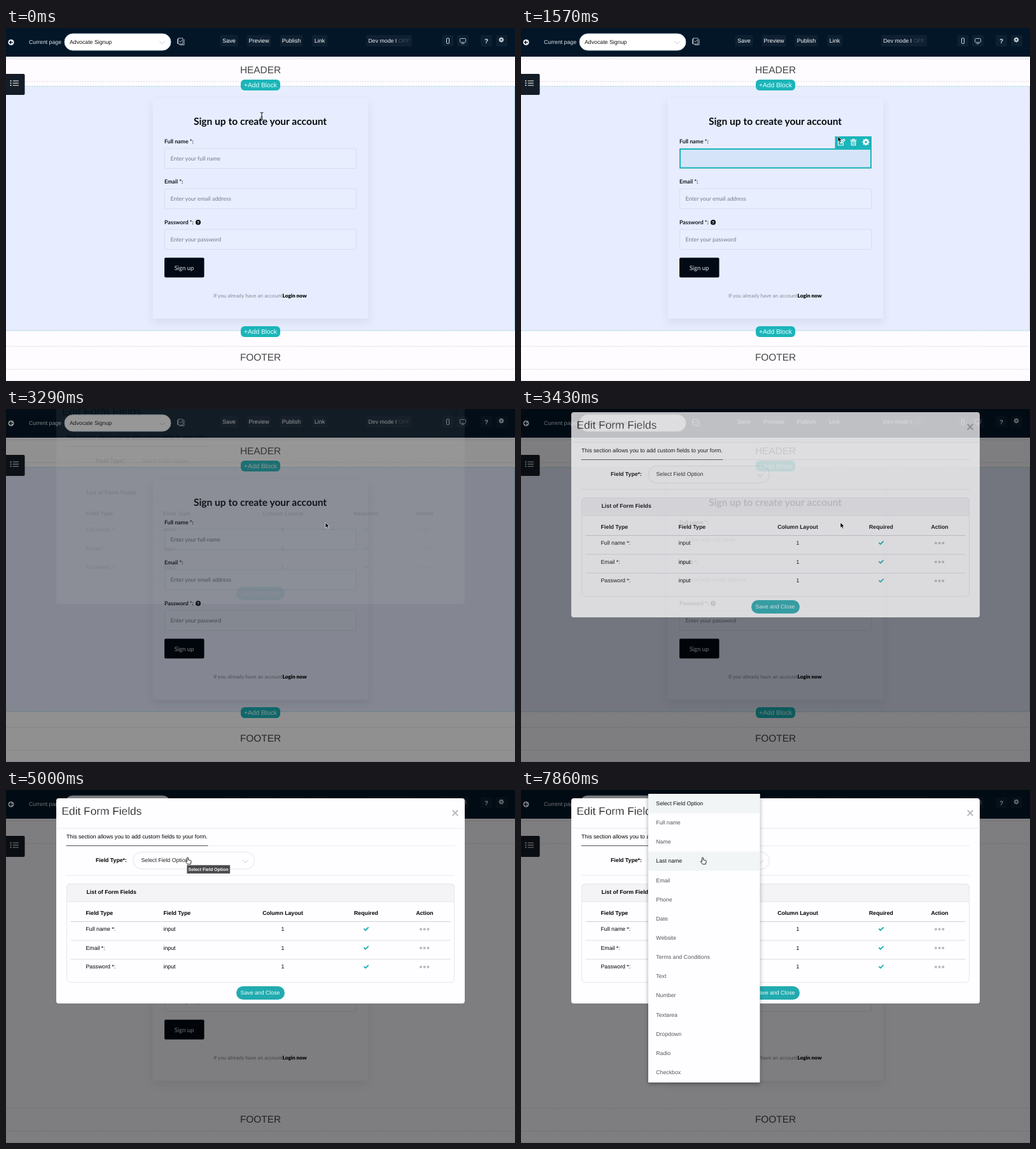
Recreate the animation shown at these times as an HTML page. Size 800 by 554 pixels, loop 8000 ms.

```html
<!DOCTYPE html>
<html lang="en">
<head>
<meta charset="utf-8">
<title>Form builder</title>
<style>
  html, body { margin: 0; width: 100%; height: 100%; overflow: hidden; background: #fefcff; }
  svg { display: block; width: 800px; height: 554px; }
  text { font: 8.76px "Liberation Sans", Arial, sans-serif; text-rendering: geometricPrecision; white-space: pre; }
  .lato { font-family: Lato, sans-serif; }
  .bold { font-weight: 700; }
  .mid { text-anchor: middle; }
  .line { fill: none; stroke-linecap: round; stroke-linejoin: round; }
  #card { filter: drop-shadow(0 6px 7px rgba(10, 20, 50, .08)); }
  #tint { mix-blend-mode: multiply; }
  #menu > rect:first-child { filter: drop-shadow(0 2px 3px rgba(0, 0, 0, .35)); }
</style>
</head>
<body>
<svg id="stage" viewBox="0 0 800 554" xmlns="http://www.w3.org/2000/svg">
  <defs>
    <path id="gear" d="M-1-5h2l.4 1.5 1.2.5 1.4-.8 1.3 1.3-.8 1.4.5 1.2 1.5.4v2l-1.5.4-.5 1.2.8 1.4-1.3 1.3-1.4-.8-1.2.5L1 8h-2l-.4-1.5-1.2-.5-1.4.8-1.3-1.3.8-1.4L-5 2.9l-1.5-.4v-2L-5 .1l.5-1.2-.8-1.4L-4-3.8l1.4.8 1.2-.5zM0-.6a2.1 2.1 0 1 0 .01 0z" fill-rule="evenodd"/>
    <path id="tick" class="line" d="M-3 .2L-.9 2.2 3.2-2" stroke="#1bb0b4" stroke-width="1.9"/>
    <g id="dots" fill="#b9b9bd"><circle cx="-5.7" r="2"/><circle r="2"/><circle cx="5.7" r="2"/></g>
  </defs>
  <g id="page"></g>
  <rect id="shade" width="800" height="554"/>
  <g id="modal"></g>
  <g id="menu"></g>
  <g id="tip"></g>
  <g id="cursor">
    <path class="line" d="M-2-5.5Q0-5.5 0-4Q0-5.5 2-5.5M0-4V4M-2 5.500Q0 5.500 0 4Q0 5.500 2 5.500M-1 1.500H1" stroke="#111" stroke-width="1"/>
    <path d="M0 0V8.600L2 6.800 3.300 9.900 4.900 9.200 3.600 6.200H6.200Z" fill="#000" stroke="#fff" stroke-width=".7"/>
    <path d="M-1 .8Q0-.4 1 .8V4.200L4.800 5Q5.800 5.400 5.600 6.600L4.800 10.800H-.2L-3.300 6.800Q-3.200 5.400-1 6.800Z" fill="#fff" stroke="#111" stroke-width=".9" stroke-linejoin="round"/>
  </g>
</svg>
<script>
const $ = id => document.getElementById(id);
const TEAL = '#1bb5b9';

const attrs = o => Object.entries(o).map(([k, v]) => ` ${k}="${v}"`).join('');
const text = (x, y, s, cls = '', o = {}) => `<text x="${x}" y="${y}" class="${cls}"${attrs(o)}>${s}</text>`;
const size = (px, more = '') => ({ style: `font-size:${px}px;${more}` });
const box = (x, y, x2, y2, fill, r = 0, o = {}) =>
  `<rect x="${x}" y="${y}" width="${x2 - x}" height="${y2 - y}" rx="${r}" fill="${fill}"${attrs(o)}/>`;
const path = (d, stroke, w = 1, o = {}) =>
  `<path class="line" d="${d}" stroke="${stroke}" stroke-width="${w}"${attrs(o)}/>`;
const rule = (y, stroke, x = 0, x2 = 800, o = {}) => path(`M${x} ${y}H${x2}`, stroke, 1, o);
const gear = (x, y, s, fill) => `<use href="#gear" fill="${fill}" transform="translate(${x} ${y}) scale(${s}) translate(0 -1.5)"/>`;
const dash = { 'stroke-dasharray': '2 2', 'stroke-linecap': 'butt' };

function topBar() {
  const buttons = [[350.5, 'Save', 14], [397.5, 'Preview', 19], [448.5, 'Publish', 18], [493, 'Link', 12]];
  const dim = 'rgba(255,255,255,.045)';
  return box(0, 0, 800, 45, '#031628') +
    '<circle cx="8" cy="22.500" r="4.600" fill="#fff"/>' +
    path('M10.500 22.500H5.800M7.800 20.300L5.600 22.500L7.800 24.700', '#031628', 1.3) +
    text(36, 25, 'Current page', '', { fill: '#e3e7ea' }) +
    box(92, 9, 259, 35, '#fff', 13, { stroke: '#cddcf0' }) +
    text(100, 25, 'Advocate Signup', '', { fill: '#111' }) +
    path('M241.500 21L245.500 25L249.500 21', '#c3c7cc') +
    path('M271 17.500H269.500V24.500M271 16H278V25H271ZM280 18V26.500H273M272.700 20.500L274.200 22L276.700 18.800', '#aeb7bf') +
    buttons.map(([x, s, w]) => box(x - w, 11, x + w, 29, dim, 2) +
      text(x, 23, s, 'mid', { fill: '#fff', ...size(9) })).join('') +
    box(566, 11, 638, 29, dim, 2) +
    text(569.5, 23, 'Dev mode I <tspan fill="#414d59">OFF</tspan>', '', { fill: '#f0f2f4' }) +
    [694.5, 718, 755, 779].map(x => box(x - 9, 11, x + 9, 29, dim, 2)).join('') +
    box(692.5, 16, 696.5, 24.5, 'none', 1, { stroke: '#dde2e6' }) +
    box(713.5, 16.5, 722.5, 22.5, 'none', 1, { stroke: '#b9c1c8' }) +
    path('M716 24.500H720', '#b9c1c8') +
    text(755, 23.5, '?', 'mid bold', { fill: '#e8ebee', ...size(10) }) +
    gear(778.5, 18.5, .62, '#d5dade');
}

const addBlock = y => box(369, y, 431, y + 17, TEAL, 6) +
  text(400, y + 11.5, '+Add Block', 'mid', { fill: '#e9ffff', ...size(10.2) });

const input = (y, label, hint) =>
  text(249, y - 8.5, label, 'lato bold', { fill: '#15181f', ...size(8.8) }) +
  box(249.5, y, 550.5, y + 31.5, 'rgba(255,255,255,.06)', 2, { stroke: 'rgba(70,90,130,.11)' }) +
  text(258.5, y + 19, hint, 'lato', { fill: '#737a86', ...size(8.88) });

function hoverTools() {
  return box(250, 190, 550, 219.5, '#d6e4fa', 0, { stroke: TEAL, 'stroke-width': 2 }) +
    box(493.5, 170, 551, 190, TEAL) +
    path('M505 175.500H498.500V184H506.500V180.500M502.500 181L503 179L507.500 174.500L509 176L504.500 180.500Z', '#fff', 1.2) +
    path('M518 176H527M521 175.500V174.500H524V175.500M519 177.500L519.500 184H525.500L526 177.500Z', '#fff', 1.2) +
    path('M521.300 178.500V182.500M523.700 178.500V182.500', '#fff', .9) +
    gear(542, 179, .84, '#fff');
}

$('page').innerHTML =
  box(0, 0, 800, 554, '#fefcff') +
  [48.5, 84, 499.5, 535.5].map(y => rule(y, '#dfdde3', 0, 800, dash)).join('') +
  rule(553.5, '#eceaee') +
  text(400, 70.5, 'HEADER', 'mid', { fill: '#444', ...size(15.4) }) +
  text(400, 521.5, 'FOOTER', 'mid', { fill: '#444', ...size(15.4) }) +
  `<g id="card">${box(230.5, 110, 569.5, 456, '#fefcff', 2)}</g>` +
  box(0, 92, 800, 475, '#e8f0fe', 0, { id: 'tint' }) +
  `<g id="block">${rule(91.5, '#a6d3de', 0, 800, dash)}${rule(475, '#a6d3de', 0, 800, dash)}` +
  path('M799.500 92V475', '#8fc6dc', 1, dash) + addBlock(81) + addBlock(468) + '</g>' +
  topBar() +
  box(-3, 72, 29.5, 105, '#141d27', 2) +
  [83, 86.5, 90].map(y => `<circle cx="7.500" cy="${y}" r="1" fill="#fff"/>` + rule(y, '#fff', 11, 19.5)).join('') +
  text(399.5, 152, 'Sign up to create your account', 'lato bold mid', { fill: '#05090f', ...size(15.55) }) +
  input(189, 'Full name *:', 'Enter your full name') +
  input(252.3, 'Email *:', 'Enter your email address') +
  input(316, 'Password *:', 'Enter your password') +
  '<circle cx="302" cy="305" r="4" fill="#05090f"/>' +
  text(302, 307.6, '?', 'mid bold', { fill: '#fff', ...size(7) }) +
  box(249, 360.5, 311.5, 391.5, '#020a15', 2) +
  text(280, 379.5, 'Sign up', 'lato mid', { fill: '#e4e8ec', ...size(9.5) }) +
  text(326, 423, 'If you already have an account ', 'lato', { fill: '#858b95', ...size(8.23) }) +
  text(434.5, 423, 'Login now', 'lato', { fill: '#000', ...size(8.23, 'font-weight:900') }) +
  `<g id="tools">${hoverTools()}</g>`;

const row = (name, i) => {
  const y = 221 + i * 29.6;
  return text(125.5, y, name) + text(247.5, y, 'input') + text(435, y, '1', 'mid') +
    `<use href="#tick" x="566" y="${y - 3}"/><use href="#dots" x="657.700" y="${y - 2.5}"/>` +
    (i < 2 ? rule(y + 15, '#dcdde3', 102, 698) : '');
};

$('modal').innerHTML =
  box(79, 13, 721, 335, '#fefdff', 4) +
  text(87.5, 39, 'Edit Form Fields', '', { fill: '#111', stroke: '#fefdff', 'stroke-width': .35, ...size(17.3) }) +
  path('M702.300 32.300L709.700 39.700M709.700 32.300L702.300 39.700', '#bdbdc1', 2.2, { 'stroke-linecap': 'butt' }) +
  rule(60, '#e9e8ec', 79, 721) +
  text(95, 76, 'This section allows you to add custom fields to your form.') +
  rule(87.5, '#ecebef', 317, 705) + rule(87.5, '#55555a', 95, 317) +
  text(141, 113, 'Field Type*:', 'bold') +
  box(200, 97.5, 390.5, 124, '#fefdff', 13, { stroke: '#e3e6ea' }) +
  text(212.5, 113, 'Select Field Option', '', { fill: '#222' }) +
  path('M372.500 110.500L376.300 114.300L380 110.500', '#c6cacf') +
  rule(134, '#e9e8ec', 95, 705) +
  box(95.5, 147.5, 704.5, 302, '#fefdff', 6) +
  path('M95.500 175V153.500Q95.500 147.500 101.500 147.500H698.500Q704.500 147.500 704.500 153.500V175Z', '#e6e6ea', 1, { style: 'fill:#f4f3f5' }) +
  box(95.5, 147.5, 704.5, 302, 'none', 6, { stroke: '#e6e6ea' }) +
  text(126.5, 163, 'List of Form Fields', 'bold') +
  text(125.5, 196, 'Field Type', 'bold') + text(247.5, 196, 'Field Type', 'bold') +
  text(435, 196, 'Column Layout', 'bold mid') + text(566, 196, 'Required', 'bold mid') +
  text(658, 196, 'Action', 'bold mid') +
  rule(206.5, '#cfd1da', 102, 698) +
  ['Full name *:', 'Email *:', 'Password *:'].map(row).join('') +
  box(362, 308, 438, 329, '#22abaf', 10.5) +
  text(399.5, 321, 'Save and Close', 'mid', { fill: '#f2ffff' });

const options = ['Select Field Option', 'Full name', 'Name', 'Last name', 'Email', 'Phone', 'Date', 'Website',
  'Terms and Conditions', 'Text', 'Number', 'Textarea', 'Dropdown', 'Radio', 'Checkbox'];
$('menu').innerHTML = box(200, 6, 375.5, 459, '#fefdff', 1) + options.map((s, i) => {
  const y = 6.3 + i * 30.14, lit = i === 0 || i === 3;
  return (lit ? box(200, y, 375.5, y + 30.1, '#f1f5f5') : '') +
    text(212.3, y + 17.7, s, '', { fill: lit ? '#111' : '#55555a' });
}).join('');

$('tip').innerHTML = box(284.5, 118, 352, 131, '#4a494c', 0, { stroke: '#8a888c', 'stroke-width': .5 }) +
  text(318, 127, 'Select Field Option', 'bold mid', { fill: '#fff', ...size(6.95) });

// Each row: time, then values; eased between rows when asked.
const moves = [[140, 402, 138], [710, 440, 196], [1140, 488, 192], [1570, 498, 170], [2140, 502, 178],
  [3710, 502, 178], [4570, 285.5, 105.5]];
const shade = [[3000, 0], [3140, .02], [3290, .43], [3430, .5]];
const open = [[3140, 0, -45], [3290, .06, -29], [3430, .75, -8], [3570, 1, -1], [3710, 1, 0]];
const tint = [[3570, 1], [4000, 0]];
const drop = [[5430, 0], [5570, .45], [5710, .9], [5860, 1]];

function at(rows, t, ease = u => u) {
  let i = rows.findIndex(r => r[0] > t);
  if (i === 0) return rows[0].slice(1);
  if (i < 0) return rows[rows.length - 1].slice(1);
  const a = rows[i - 1], b = rows[i], u = ease((t - a[0]) / (b[0] - a[0]));
  return a.slice(1).map((v, k) => v + (b[k + 1] - v) * u);
}
const smooth = u => u * u * (3 - 2 * u);
const fade = (id, v) => { $(id).style.opacity = v; };

const LOOP = 8000, STEP = 1000 / 7;
const shapes = [...$('cursor').children];
const start = performance.now();

function draw() {
  const now = (performance.now() - start) % LOOP;
  const t = Math.round(Math.floor((now + 5) / STEP) * STEP / 10) * 10;
  const [x, y] = at(moves, t, smooth);
  const kind = t < 1430 ? 0 : t < 4290 ? 1 : 2;
  $('cursor').setAttribute('transform', `translate(${x} ${y})`);
  shapes.forEach((s, i) => { s.style.display = i === kind ? '' : 'none'; });
  fade('tools', t >= 570 && t < 3140 ? 1 : 0);
  fade('shade', at(shade, t)[0]);
  const [o, dy] = at(open, t);
  fade('modal', o);
  $('modal').setAttribute('transform', `translate(0 ${dy})`);
  const [b] = at(tint, t);
  fade('tint', b);
  fade('block', b);
  fade('tip', t >= 4860 && t < 5570 ? 1 : 0);
  fade('menu', at(drop, t)[0]);
  requestAnimationFrame(draw);
}
draw();
</script>
</body>
</html>
```
